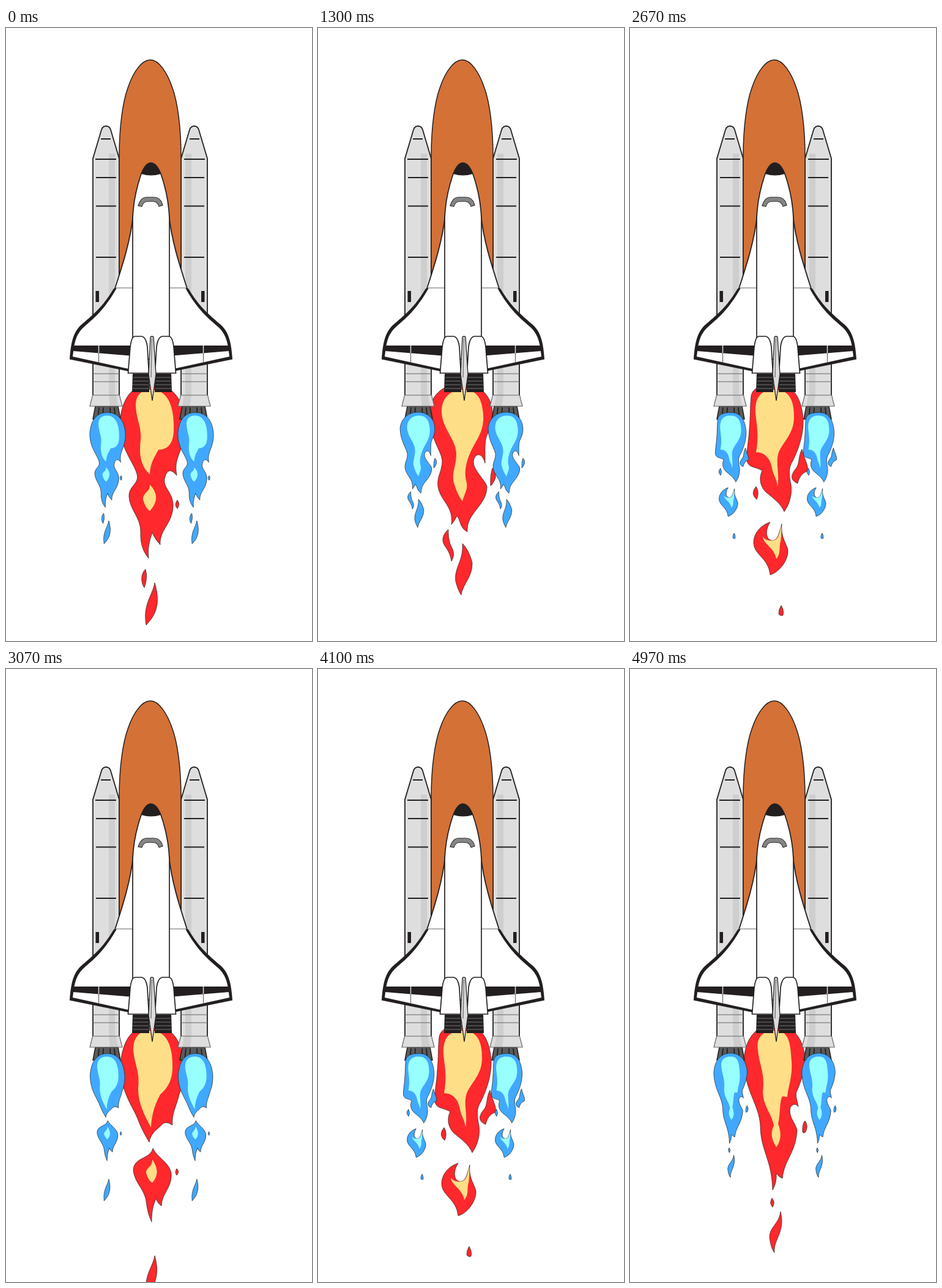
Recreate the animation shown at these times as an HTML page without scripts. Size 500x1000 px, loop 5030 ms.

```html
<!DOCTYPE html>
<html lang="en">
<head>
<meta charset="utf-8">
<title>Rocket launch</title>
<style>
html, body { margin: 0; width: 100%; height: 100%; overflow: hidden; background: #fff; }
svg { display: block; width: 100%; height: 100%; }
.line { fill: none; stroke: #231f20; stroke-width: 1.8; }
.thin { fill: none; stroke: #666; stroke-width: 1.2; }
.white { fill: #fff; stroke: #231f20; stroke-width: 1.7; }
.ink { fill: #231f20; }

/* flame drawings: outer and inner colour come from the parent */
.o { fill: var(--outer); stroke: #222; stroke-width: .7; vector-effect: non-scaling-stroke; }
.i { fill: var(--inner); }
.red { --outer: #ff282c; --inner: #fedf88; }
.blue { --outer: #40a9ff; --inner: #98ffff; }

/* nine drawings, one shown at a time */
.pose {
  --loop: calc(5030ms / 7);
  visibility: hidden;
  animation: show var(--loop) step-end infinite;
  animation-delay: calc((var(--n) - 9) * var(--loop) / 9);
}
@keyframes show {
  0% { visibility: visible; }
  11.1111%, 100% { visibility: hidden; }
}
</style>
</head>
<body>
<svg viewBox="0 0 500 1000">
<defs>
  <g id="p0">
    <path class="o" d="M238 581C200 581 187 614 186 648C187 688 209 708 214 728C218 744 201 746 201 764C202 786 220 798 220 822C219 842 225 856 233 865C231 846 235 836 239 823Q243 834 252 843C250 818 274 808 273 776C271 756 257 750 259 736C262 722 268 717 279 730C276 712 279 706 283 694C289 680 293 666 293 648C292 612 276 581 238 581Z
      M280 770Q285 777 280 784Q274 778 280 770ZM228 883C220 890 220 905 226 913Q232 897 228 883ZM243 905C240 925 223 940 229 974C240 962 255 945 243 905Z"/>
    <path class="i" d="M237 590C220 590 212 600 212 616C213 640 222 650 220 672C217 695 220 715 235 728C236 708 243 700 249 688C258 688 274 684 274 655C275 625 268 590 237 590ZM235 745C236 757 223 758 224 769Q227 782 235 788C247 775 250 760 235 745Z"/>
  </g>
  <g id="p1">
    <path class="o" d="M238 581C202 581 187 614 186 650C187 690 212 712 217 738C222 758 204 764 204 784C205 806 222 818 224 842C224 860 228 872 235 884C233 866 238 854 241 842Q245 852 253 858C251 838 273 828 271 798C268 778 249 770 252 752C255 738 262 732 276 742C272 724 280 712 284 694C290 680 292 666 292 648C290 612 274 581 238 581Z
      M280 793Q285 799 280 806Q275 800 280 793ZM228 905C221 912 221 924 226 932Q232 917 228 905ZM243 930C240 950 224 964 229 997C240 985 254 968 243 930Z"/>
    <path class="i" d="M237 590C218 590 210 602 210 620C212 645 221 655 218 680C216 705 222 728 236 740C237 718 245 706 250 694C262 688 275 676 274 650C274 620 266 590 237 590ZM237 766C238 778 226 780 227 790Q230 803 237 808C248 795 250 782 237 766Z"/>
  </g>
  <g id="p2">
    <path class="o" d="M238 581C202 581 188 614 187 650C188 692 208 714 216 736Q222 752 234 772C236 758 246 752 254 744Q260 736 272 744C270 726 279 712 283 694C289 680 291 666 291 648C289 612 274 581 238 581Z
      M240 782C236 800 208 796 208 818C210 838 226 848 229 868Q231 888 238 902C238 880 242 872 245 864Q248 872 254 876C254 856 272 846 270 822C266 804 248 798 240 782Z
      M279 815Q284 820 279 826Q275 821 279 815ZM243 957C240 976 225 988 229 1022C240 1010 253 992 243 957Z"/>
    <path class="i" d="M237 590C216 590 208 602 208 622C210 645 219 658 216 682C215 706 226 728 237 748C238 722 246 706 252 694C264 684 273 670 272 646C272 618 264 590 237 590ZM239 800C240 812 228 814 229 822Q232 834 239 838C248 828 250 816 239 800Z"/>
  </g>
  <g id="p3">
    <path class="o" d="M238 581C204 581 190 612 189 650C190 690 208 708 212 728C216 750 232 762 236 786C240 770 258 762 262 746Q266 732 275 738C270 720 279 708 283 690C288 678 289 664 289 646C288 610 272 581 238 581Z
      M242 826C238 842 214 842 214 860C216 876 230 886 233 902Q234 918 240 932C240 914 246 906 250 898C262 888 268 876 264 860Q252 846 242 826ZM243 985Q250 1000 240 1015Q234 1004 243 985Z"/>
    <path class="i" d="M237 590C214 590 206 602 207 624C209 648 217 660 214 684C214 708 232 728 238 754C241 728 242 710 250 694C262 680 271 664 270 642C270 614 262 590 237 590ZM241 848Q228 862 238 878Q252 866 241 848Z"/>
  </g>
  <g id="p4">
    <path class="o" d="M238 581C207 581 193 612 192 650C191 692 206 704 211 722C214 746 203 752 206 768C210 784 228 790 234 814C238 796 262 786 264 764C264 748 256 734 264 720Q272 722 281 728C276 712 279 700 283 684C287 672 287 658 287 644C286 610 272 581 238 581Z
      M244 878C242 894 226 896 227 912Q230 930 240 950C240 930 256 918 254 900Q250 888 244 878Z"/>
    <path class="i" d="M236 590C213 590 205 602 206 626C208 650 214 662 211 686C216 706 230 722 230 742Q228 758 236 778C244 758 242 742 240 728C238 710 246 698 252 688C264 674 270 660 269 638C269 612 262 590 236 590Z"/>
  </g>
  <g id="p5">
    <path class="o" d="M237 581C208 581 195 604 193 640C190 690 202 706 212 722C212 742 218 752 228 762C222 774 203 782 203 802C204 820 222 828 226 856C236 846 258 842 258 818C257 804 246 790 250 776C262 764 264 745 262 732Q264 714 272 704Q280 716 287 722C280 702 281 690 283 680C287 644 280 581 237 581Z
      M206 738Q211 746 207 755Q199 748 206 738ZM246 918Q253 930 247 944Q239 936 246 918Z"/>
    <path class="i" d="M236 590C212 590 204 603 205 627C208 650 212 662 208 690C219 698 230 712 232 728Q234 740 240 752C244 728 238 710 246 692C256 674 269 662 268 636C268 611 262 590 236 590ZM238 784C238 798 222 798 224 810Q232 816 234 830C246 818 246 800 238 784Z"/>
  </g>
  <g id="p6">
    <path class="o" d="M238 581C216 581 201 586 198 600C196 618 197 634 195 654C194 675 190 690 191 706C194 718 204 715 216 722C210 735 213 748 222 757C235 768 246 775 252 789C262 775 265 758 263 745C260 730 258 718 266 706C274 690 284 665 283 638C281 612 272 581 238 581Z
      M281 687C285 705 292 712 290 723C281 726 276 733 274 743C260 737 264 728 270 720C278 712 274 700 281 687ZM206 748Q212 757 207 769Q196 760 206 748Z
      M229 806C212 812 202 825 202 840C203 860 226 864 229 892C244 888 259 868 258 852C256 840 246 832 248 809C244 822 242 836 233 836C223 836 219 822 229 806ZM247 942Q252 950 250 958Q246 960 243 956Q243 948 247 942Z"/>
    <path class="i" d="M236 590C212 590 204 605 205 628C207 650 211 662 206 692C222 692 230 705 232 718C234 730 240 735 241 748C245 725 237 710 243 692C250 675 268 662 268 635C268 610 262 590 236 590ZM247 812C244 826 242 836 233 836C225 837 220 834 217 830C218 842 236 848 239 866C247 858 243 846 246 838Q248 826 247 812Z"/>
  </g>
  <g id="p7">
    <path class="o" d="M235 580C203 580 182 602 181 630C182 668 202 690 203 706C203 724 194 730 196 748C200 772 222 780 218 810Q224 803 227 796C233 802 231 815 244 822C242 790 276 780 276 748C274 738 254 722 254 708C255 694 268 690 273 710C273 680 272 672 278 660C284 648 286 638 285 626C284 602 266 580 235 580Z
      M285 718Q291 722 290 734Q286 744 282 747Q281 730 285 718ZM213 818C202 828 202 838 208 846C214 854 217 862 218 870C225 858 220 850 216 842Q212 830 213 818ZM236 841C238 870 222 880 225 903Q229 918 234 925C236 908 253 895 252 872Q246 850 236 841Z"/>
    <path class="i" d="M237 590C215 590 201 605 202 628C204 655 226 672 226 695C226 715 218 725 222 742Q228 762 236 772C240 757 246 752 242 738C238 722 243 700 258 675C270 655 272 640 269 622C266 600 256 590 237 590Z"/>
  </g>
  <g id="p8">
    <path class="o" d="M237 580C202 580 187 608 186 641C188 690 211 710 213 745C213 785 232 800 233 850Q240 838 239 823Q244 829 249 831C252 800 271 790 273 752C270 740 258 730 262 715C267 708 272 710 275 714C273 702 270 697 272 690C280 672 286 654 286 634C284 606 268 580 237 580Z
      M286 737Q292 745 287 755Q281 761 282 749Q283 739 286 737ZM232 863Q238 870 233 878Q227 872 232 863ZM246 885C244 905 228 910 228 927Q230 945 236 952C234 930 254 920 246 885Z"/>
    <path class="i" d="M237 590C215 590 206 603 209 622C211 645 221 660 217 690C218 715 232 725 235 745C230 755 230 765 239 780C248 768 247 755 242 742C246 725 244 705 249 697L257 698C258 682 266 665 264 640C262 615 262 590 237 590Z"/>
  </g>

  <g id="booster">
    <path fill="#5b5b5b" stroke="#231f20" stroke-width="1.5" d="M146 617H183L187 638H142Z"/>
    <path class="line" d="M152 619L150 638M159 619L158 638M170 619L171 638M177 619L179 638"/>
    <path fill="#dedede" d="M142 600V213L156 166Q158 160 163.500 160T171 166L185 213V600Z"/>
    <path fill="#cecece" d="M168 205H178V600H168Z"/>
    <path class="line" d="M142 600V213L156 166Q158 160 163.500 160T171 166L185 213V600"/>
    <path fill="#dedede" d="M141.500 599H185.500L190 617H137Z"/>
    <path fill="#cecece" d="M168 599H180L183 617H170Z"/>
    <path class="thin" d="M141.500 599H185.500L190 617H137ZM142 564H185M142 577H185"/>
    <path class="line" d="M155 181H171M146 214H180M147 244H180M147 290.500H180M147 374H180"/>
    <path class="ink" d="M146.500 429H152V447H146.500Z"/>
  </g>

  <g id="wing">
    <path fill="#fff" d="M208 303C204 345 191 385 178 425C160 458 140 472 124 486C112 496 107 510 105 540L200 559H210Z"/>
    <path class="line" d="M208 303C204 345 191 385 178 425"/>
    <path class="ink" d="M181 424C161 460 142 475 127 488C115 499 112 512 110 528L109 536L200 556V560L104 540.500C106 512 110 497 122 485C139 470 158 456 176 425Z"/>
    <path class="ink" d="M110 518H208V535L110 527Z"/>
    <path class="thin" d="M180 424H208M151.500 530V546"/>
    <path stroke="#ddd" stroke-width="1.5" d="M151.500 518V530"/>
  </g>

  <g id="pod">
    <path class="ink" d="M207 564H234V594H206Z"/>
    <path stroke="#777" stroke-width="1.2" d="M208 570H233M208 576H233M207 582H233M207 588H233"/>
    <path class="white" d="M199.500 563L203 520Q205 503 211 503H222Q229 505 231 520L233.500 563Z"/>
  </g>
</defs>

<g class="red">
  <use class="pose" style="--n:0" href="#p0"/>
  <use class="pose" style="--n:1" href="#p1"/>
  <use class="pose" style="--n:2" href="#p2"/>
  <use class="pose" style="--n:3" href="#p3"/>
  <use class="pose" style="--n:4" href="#p4"/>
  <use class="pose" style="--n:5" href="#p5"/>
  <use class="pose" style="--n:6" href="#p6"/>
  <use class="pose" style="--n:7" href="#p7"/>
  <use class="pose" style="--n:8" href="#p8"/>
</g>

<use href="#booster"/>
<use href="#booster" transform="matrix(-1 0 0 1 471 0)"/>

<!-- side flames: the same drawings, smaller; 264 units = 144 px apart -->
<g class="blue" transform="translate(35.500 310.600) scale(.545)">
  <g class="pose" style="--n:0"><use href="#p0"/><use href="#p0" x="264"/></g>
  <g class="pose" style="--n:1"><use href="#p1"/><use href="#p1" x="264"/></g>
  <g class="pose" style="--n:2"><use href="#p2"/><use href="#p2" x="264"/></g>
  <g class="pose" style="--n:3"><use href="#p3"/><use href="#p3" x="264"/></g>
  <g class="pose" style="--n:4"><use href="#p4"/><use href="#p4" x="264"/></g>
  <g class="pose" style="--n:5"><use href="#p5"/><use href="#p5" x="264"/></g>
  <g class="pose" style="--n:6"><use href="#p6"/><use href="#p6" x="264"/></g>
  <g class="pose" style="--n:7"><use href="#p7"/><use href="#p7" x="264"/></g>
  <g class="pose" style="--n:8"><use href="#p8"/><use href="#p8" x="264"/></g>
</g>

<path fill="#d47136" stroke="#231f20" stroke-width="1.5" d="M185 402V210C185 160 191 120 199 98C208 71 222 52 236 52C249 52 263 71 272 98C280 120 286 160 286 210V402Z"/>

<use href="#wing"/>
<use href="#wing" transform="matrix(-1 0 0 1 474 0)"/>
<path class="white" d="M207 540V310C208 285 214 258 221 238C226 225 231 220 236.500 220C242 220 248 225 253 238C260 258 266 285 267 310V540Z"/>
<path class="ink" d="M221 238C226 225 231 220 236.500 220C242 220 248 225 253 238Q237 243 221 238Z"/>
<path fill="#858585" stroke="#333" stroke-width="1.2" d="M216 290C219 280 224 276 230 276H242C250 276 254 281 256 289L250 291C248 285 245 283 241 283H231C226 283 224 286 222 291Z"/>

<use href="#pod"/>
<use href="#pod" transform="matrix(-1 0 0 1 477 0)"/>
<path fill="#dcdcdc" stroke="#231f20" stroke-width="1.3" d="M236 504Q238.500 502 241 504L245 565L239 608L233 565Z"/>
<path class="thin" d="M238.500 506L237 570"/>
</svg>
</body>
</html>
```
